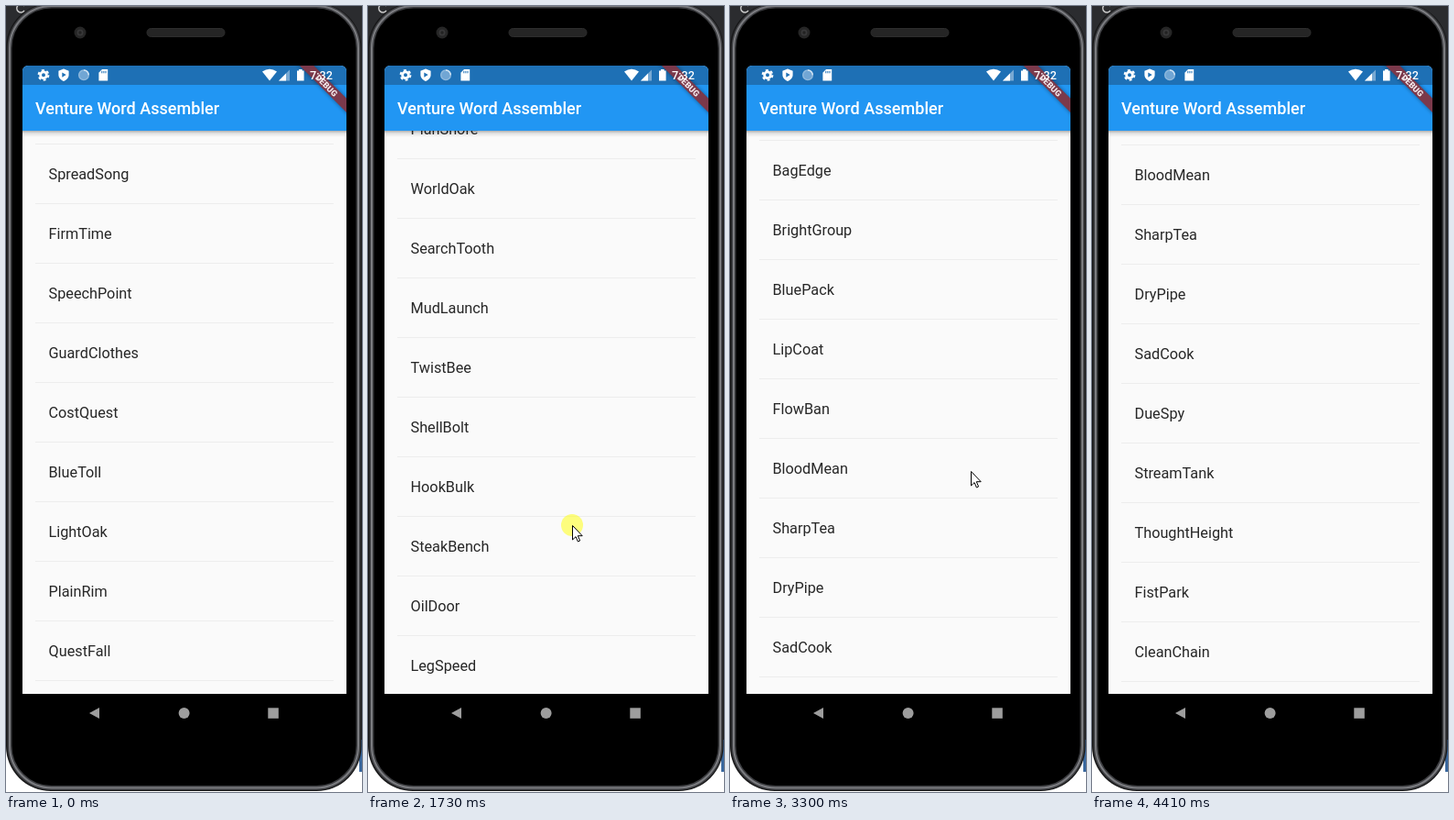
Write an HTML page that moves like this. It is 389 px wide and 857 px high and loops after 5.01 s.

```html
<!DOCTYPE html>
<html lang="en">
<head>
<meta charset="utf-8">
<title>Scrolling word list</title>
<style>
  html, body { margin: 0; width: 100%; height: 100%; overflow: hidden; background: #fff; }
  svg { display: block; width: 389px; height: 857px; }
  text { font-family: Roboto, "Open Sans", sans-serif; white-space: pre; }
  #list text { font-size: 16.25px; fill: #272727; }
  #list path { stroke: #ededed; }
  .title { font-size: 18.06px; font-weight: 500; fill: #fff; }
  .clock { font-size: 12.6px; font-weight: 500; fill: #fff; }
  .debug { font-size: 9.2px; font-weight: 900; fill: #f4eaec; text-anchor: middle; }
</style>
</head>
<body>
<svg viewBox="0 0 389 857">
  <defs>
    <clipPath id="screen"><path d="M18 750V72q0-7 7-7h340q7 0 7 7v678z"/></clipPath>
    <linearGradient id="shade" x1="0" y1="0" x2="0" y2="1">
      <stop offset="0" stop-opacity=".3"/>
      <stop offset=".4" stop-opacity=".1"/>
      <stop offset="1" stop-opacity="0"/>
    </linearGradient>
    <filter id="soft" x="-20%" y="-80%" width="140%" height="260%"><feGaussianBlur stdDeviation="2"/></filter>
  </defs>

  <!-- desktop behind the phone -->
  <rect width="389" height="857" fill="#fff"/>
  <rect width="389" height="800" fill="#2b2c2f"/>
  <rect x="386" y="800" width="3" height="35" fill="#3a689e"/>
  <path d="M20 0a4.5 4.5 0 1 0 0 5" fill="none" stroke="#ccc" stroke-width="1.4"/>

  <!-- phone body -->
  <rect x="0" y="-3" width="388.5" height="859" rx="49" fill="#161617"/>
  <rect x="4" y="0" width="381" height="852.5" rx="46" fill="#000" stroke="#3c3d40" stroke-width="5"/>
  <rect x="4" y="0" width="381" height="852.5" rx="46" fill="none" stroke="#7b7c80" stroke-width="2"/>
  <circle cx="81" cy="29" r="6.5" fill="#262626"/>
  <circle cx="81" cy="29" r="3.5" fill="#383839"/>
  <circle cx="81" cy="29" r="1.7" fill="#222"/>
  <rect x="154" y="24.5" width="85" height="9" rx="4.5" fill="#252525" stroke="#2d2d2d"/>

  <g clip-path="url(#screen)">
    <rect x="18" y="65" width="354" height="685" fill="#fafafa"/>
    <g id="list"></g>
    <rect x="18" y="136" width="354" height="7" fill="url(#shade)"/>
    <rect x="18" y="65" width="354" height="71" fill="#2196f3"/>
    <rect x="18" y="65" width="354" height="21" fill="#1e70b5"/>
    <text class="title" x="32" y="118">Venture Word Assembler</text>

    <g transform="translate(372 65) rotate(45)">
      <rect x="-45" y="25.3" width="90" height="10.8" opacity=".4" filter="url(#soft)"/>
      <rect x="-45" y="25.3" width="90" height="10.8" fill="#7b394b"/>
      <text class="debug" x="0" y="34">DEBUG</text>
    </g>

    <!-- status icons -->
    <g fill="#fff">
      <circle cx="41" cy="75.3" r="3.4" fill="none" stroke="#fff" stroke-width="2.8"/>
      <circle cx="41" cy="75.3" r="5.4" fill="none" stroke="#fff" stroke-width="2" stroke-dasharray="2.9 2.755"/>
      <path d="M63 68.5l5.6 2.3v4.2c0 3.2-2.4 5.8-5.6 7-3.2-1.2-5.6-3.8-5.6-7v-4.2z"/>
      <path d="M61.3 72.4v5.4l4.4-2.7z" fill="#1e70b5"/>
      <circle cx="85" cy="75.3" r="5.3" fill="#71a6d4" stroke="#8fb9dd" stroke-width="1.4"/>
      <path d="M85 70a5.3 5.3 0 0 1 5.3 5.3" fill="none" stroke="#d3e5f4" stroke-width="1.4"/>
      <path d="M105 69h6.2v12.4h-9.8v-8.6z"/>
      <path d="M104.8 70.8v2.5M106.9 70.8v2.5M109 70.8v2.5" stroke="#1e70b5"/>
      <path d="M280 71.6q8-5.6 16 0l-8 9.8z"/>
      <path d="M298 81.4l12-12v12z" opacity=".4"/>
      <path d="M298 81.4l8-8v8z"/>
      <path d="M320 69h3.6v1.4h2v11h-7.6v-11h2z"/>
    </g>
    <text class="clock" x="332" y="80">7:32</text>
  </g>

  <g fill="#9d9d9d">
    <path d="M91 771l11-6v12z"/>
    <circle cx="194.6" cy="771" r="6"/>
    <rect x="286.3" y="765.3" width="11.5" height="11.5"/>
  </g>

  <g id="cursor">
    <circle id="press" r="12" fill="#ff0" fill-opacity=".5"/>
    <path d="M.5 .5v15.5l3.6-3.4 2.3 5.4 2.2-1-2.3-5.3h4.9z" fill="#fff" stroke="#000" stroke-linejoin="round"/>
  </g>
</svg>

<script>
const LOOP = 5010, PITCH = 65, ENTER = 130, EXIT = 4410;
const names = `SpreadSong FirmTime SpeechPoint GuardClothes CostQuest BlueToll LightOak PlainRim QuestFall
  FitMask PitSnake OakFood GladJar StrongDisk ShyFame BagRoll PlanShore WorldOak SearchTooth MudLaunch
  TwistBee ShellBolt HookBulk SteakBench OilDoor LegSpeed GriefLove RibGrave TouchSum BagEdge BrightGroup
  BluePack LipCoat FlowBan BloodMean SharpTea DryPipe SadCook DueSpy StreamTank ThoughtHeight FistPark
  CleanChain`.split(/\s+/);

// Each swipe drags the list upwards, then the list coasts until the next touch.
// rest: where the pointer goes after letting go
const swipes = [
  { down: 540, up: 750, x: 244, y: 666, drag: 152, fling: 853, power: 1, rest: { t: 1170, x: 209, y: 634 } },
  { down: 1590, up: 1860, x: 223, y: 650, drag: 162, fling: 522, power: 2, rest: { t: 2140, x: 282, y: 520 } },
  { down: 2670, up: 2880, x: 273, y: 598, drag: 108, fling: 93, power: 4, rest: { t: 3300, x: 263, y: 507 } },
  { down: 3510, up: 3860, x: 254, y: 635, drag: 180, fling: 139, power: 4, rest: { t: 4340, x: 369, y: 845 } }
];

// pointer stops, in order of time
const stops = [{ t: ENTER, x: 340, y: 845 }, { t: 340, x: 244, y: 666 }];
for (const { down, up, x, y, drag, rest } of swipes)
  stops.push({ t: down, x, y, drag: true }, { t: up, x, y: y - drag }, rest);

// refresh rhythm: from this time on, one picture per step
const rhythm = [[0, 130], [130, 70], [540, 70], [1730, 130], [1860, 70], [2670, 70], [3850, 70]];

const part = (t, a, b) => Math.min(1, Math.max(0, (t - a) / (b - a)));
const smooth = u => u * u * (3 - 2 * u);

function tick(ms) {
  const [from, step] = rhythm.filter(r => r[0] <= ms).pop();
  return from + Math.floor((ms - from) / step) * step;
}

function offset(t) {
  return swipes.reduce((sum, s, i) => {
    const end = i + 1 < swipes.length ? swipes[i + 1].down : EXIT;
    const coast = 1 - (1 - part(t, s.up, end)) ** s.power;
    return sum + s.drag * part(t, s.down, s.up) + s.fling * coast;
  }, 0);
}

function pointer(t) {
  const i = Math.max(1, stops.findIndex(s => s.t > t));
  const a = stops[i - 1], b = t < stops.at(-1).t ? stops[i] : stops.at(-1);
  const u = part(t, a.t, b.t), k = a.drag ? u : smooth(u);
  return t >= b.t ? b : { x: a.x + (b.x - a.x) * k, y: a.y + (b.y - a.y) * k };
}

const $ = id => document.getElementById(id);
const list = $('list'), cursor = $('cursor'), press = $('press');
const move = (el, x, y) => el.setAttribute('transform', `translate(${Math.round(x)} ${Math.round(y)})`);
const show = (el, on) => { el.style.display = on ? '' : 'none'; };

list.innerHTML = '<path d="M32 150.5H358"/>' + names.map((name, i) =>
  `<text x="46.5" y="${189 + i * PITCH}">${name}</text><path d="M32 ${215.5 + i * PITCH}H358"/>`).join('');

function draw(ms) {
  const t = tick(ms), { x, y } = pointer(t);
  move(list, 0, -offset(t));
  move(cursor, x, y);
  show(cursor, t >= ENTER && t < EXIT);
  show(press, swipes.some(s => t >= s.down && t < s.up));
}

const start = performance.now();
function frame() {
  draw((performance.now() - start) % LOOP);
  requestAnimationFrame(frame);
}
frame();
</script>
</body>
</html>
```
